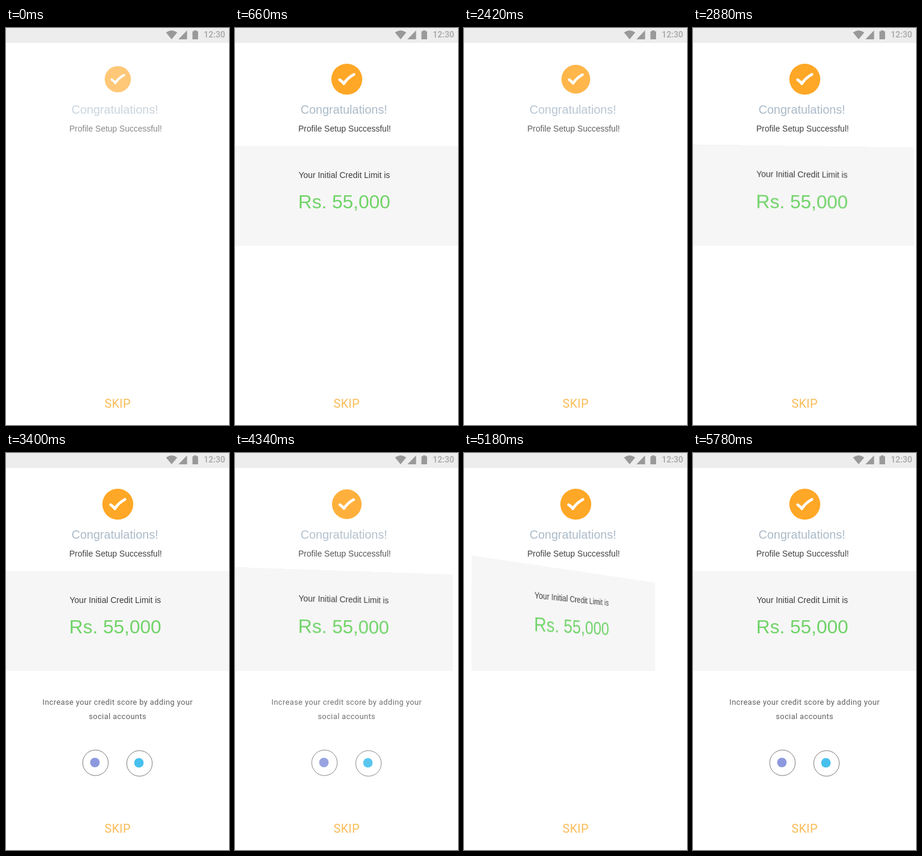
Write an HTML page that moves like this. It is 375 by 667 pixels and loops after 6.06 s.

```html
<!DOCTYPE html>
<html lang="en">
<head>
<meta charset="utf-8">
<title>Profile setup</title>
<style>
  html, body { margin: 0; width: 100%; height: 100%; overflow: hidden; background: #fff; }
  svg { position: absolute; left: 0; top: 0; font-family: "Liberation Sans", Arial, sans-serif; }
  #card { top: 198px; background: #f6f6f6; transform-origin: 50% 100%; }
  .narrow { font-family: Roboto, sans-serif; text-anchor: middle; }
</style>
</head>
<body>
<svg width="375" height="667">
  <rect width="375" height="25" fill="#ededed"/>
  <g fill="#999">
    <path d="M269 7.5Q278.5 .5 288 7.5L278.5 19Z"/>
    <path d="M304.500 4V19H290Z"/>
    <path d="M313.500 5.500H316V4H320.500V5.500H323V19H313.500Z"/>
  </g>
  <text x="350.500" y="16" class="narrow" font-size="14" font-weight="700" fill="#b0b0b0">12:30</text>

  <g id="head">
    <g id="badge">
      <circle r="26" fill="#ffa726"/>
      <path d="M-12 1Q-8 3.500-5 7.500Q1-2 12-8" fill="none" stroke="#fff" stroke-width="4.800"
        stroke-linecap="round" stroke-linejoin="round"/>
    </g>
    <text x="110.300" y="144" font-size="20" fill="#aabac8">Congratulations!</text>
    <text x="106.500" y="174" font-size="14" fill="#424242">Profile Setup Successful!</text>
  </g>

  <g id="social">
    <g class="narrow" font-size="13" letter-spacing=".4" fill="#606060">
      <text x="187.700" y="423">Increase your credit score by adding your</text>
      <text x="187.700" y="447">social accounts</text>
    </g>
    <g fill="none" stroke="#777">
      <circle cx="150.500" cy="520.500" r="21.500"/>
      <circle cx="224.500" cy="521.500" r="21.500"/>
    </g>
    <circle cx="149.500" cy="520" r="8" fill="#8c99de"/>
    <circle cx="223.500" cy="520.500" r="8" fill="#47c0ee"/>
  </g>

  <text x="187.700" y="638" class="narrow" font-size="20" letter-spacing=".4" fill="#fabb55">SKIP</text>
</svg>

<svg id="card" width="375" height="168">
  <text x="107" y="53.500" font-size="14" fill="#3c3c3c">Your Initial Credit Limit is</text>
  <text x="106.300" y="105" font-size="32" fill="#70d368">Rs. 55,000</text>
</svg>

<script>
  const LOOP = 6060, FADE = 250;
  // Start of the entrance and of the exit for each pass, in ms
  const passes = [[-34, 1949], [2358, 4337], [4738, LOOP]];
  const [head, badge, social, card] =
    ["head", "badge", "social", "card"].map(id => document.getElementById(id));

  function easeOut(ms) {
    if (ms <= 0) return 0;
    return ms >= FADE ? 1 : 1 - 2 ** (-10 * ms / FADE);
  }

  function draw(now) {
    const t = now % LOOP;
    const [enter, leave] = passes.findLast(p => t >= p[0]);
    const shown = delay => easeOut(t - enter - delay) - easeOut(t - leave);

    const top = shown(0);
    head.setAttribute("opacity", top);
    badge.setAttribute("transform", `translate(188 86) scale(${0.6 + 0.4 * top})`);
    card.style.transform = `perspective(830px) rotateY(${90 * (1 - shown(410))}deg)`;
    social.setAttribute("opacity", shown(790));
  }

  const start = performance.now();
  function tick() {
    draw(performance.now() - start);
    requestAnimationFrame(tick);
  }
  tick();
</script>
</body>
</html>
```
